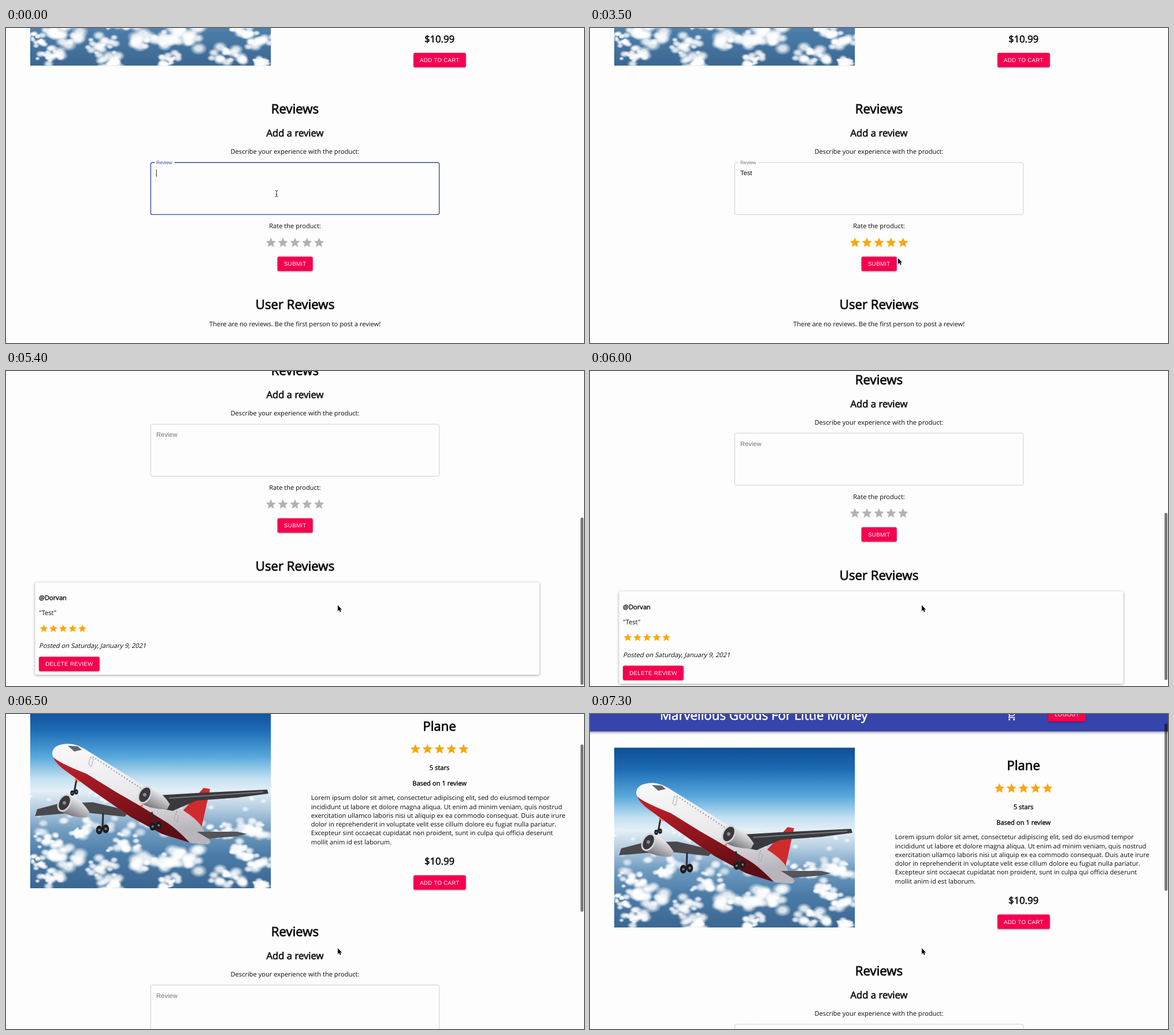
Animation of 1000x546 px, one loop 7.4 s. Source, as an HTML page:

```html
<!DOCTYPE html>
<html lang="en">
<head>
<meta charset="utf-8">
<title>Product reviews</title>
<style>
  html, body { margin: 0; width: 100%; height: 100%; overflow: hidden; background: #fdfdfd; }
  svg { display: block; width: 1000px; height: 546px; }
  text { font: 11.11px "Open Sans", "Noto Sans", sans-serif; fill: #0c0c0c; text-rendering: geometricPrecision; white-space: pre; }
  .mid { text-anchor: middle; }
  .h1 { font-size: 22.22px; }
  .h2 { font-size: 16.67px; }
  .bold { stroke: #0c0c0c; stroke-width: .036em; }
  .ui { font-family: "Liberation Sans", Arial, sans-serif; }
  .btn text { font: 9.72px "Liberation Sans", Arial, sans-serif; letter-spacing: .278px; fill: #fff; }
  .btn rect { fill: #f50050; filter: drop-shadow(0 1px 1px rgba(0,0,0,.38)); }
  .btn.over rect { fill: #ab003c; filter: drop-shadow(0 1.4px 2px rgba(0,0,0,.45)); }
  .card { fill: #fdfdfd; filter: drop-shadow(0 1.8px 2.2px rgba(0,0,0,.38)); }
  .bar { fill: #3645ac; filter: drop-shadow(0 2px 2px rgba(0,0,0,.35)); }
</style>
</head>
<body>
<svg id="stage" viewBox="0 0 1000 546">
  <defs>
    <linearGradient id="sky" x2="0" y2="1">
      <stop offset="0" stop-color="#0f4f96"/>
      <stop offset=".12" stop-color="#1d6bb5"/>
      <stop offset=".27" stop-color="#58a8dc"/>
      <stop offset=".39" stop-color="#c3e0f1"/>
      <stop offset=".46" stop-color="#e4eff7"/>
      <stop offset=".56" stop-color="#b3cce0"/>
      <stop offset=".68" stop-color="#6f9bc0"/>
      <stop offset=".82" stop-color="#4a7ba7"/>
      <stop offset="1" stop-color="#3b6791"/>
    </linearGradient>
    <linearGradient id="hull" x2=".25" y2="1">
      <stop offset="0" stop-color="#fafafa"/>
      <stop offset=".6" stop-color="#e9e7ea"/>
      <stop offset="1" stop-color="#b9b5bc"/>
    </linearGradient>
    <linearGradient id="belly" x2=".3" y2="1">
      <stop offset="0" stop-color="#c8202a"/>
      <stop offset="1" stop-color="#5d0d14"/>
    </linearGradient>
    <linearGradient id="pod" x2="0" y2="1">
      <stop offset="0" stop-color="#eeeef0"/>
      <stop offset="1" stop-color="#77757b"/>
    </linearGradient>
    <radialGradient id="puff">
      <stop offset=".35" stop-color="#fff" stop-opacity=".9"/>
      <stop offset="1" stop-color="#fff" stop-opacity="0"/>
    </radialGradient>
    <clipPath id="frame"><rect x="41.7" y="58.2" width="416.8" height="311.8"/></clipPath>
    <path id="star" d="M12 17.27 18.18 21 16.54 13.97 22 9.24 14.81 8.63 12 2 9.19 8.63 2 9.24 7.46 13.97 5.82 21z"/>
  </defs>

  <g id="page">
    <g clip-path="url(#frame)">
      <rect x="41.7" y="58.2" width="416.8" height="311.8" fill="url(#sky)"/>
      <g id="clouds" fill="url(#puff)"></g>
      <g id="plane">
        <path d="M50 245 54 233 92 223 150 221 215 236 205 246 130 238z" fill="#4a484d"/>
        <path d="M342 196 353 198 338 266 303 239z" fill="#cf2b2c"/>
        <path d="M80 138C80 124 92 120 108 119.5Q122 120 135 128L180 156 230 187 305 234Q335 253 341 268L354 290 350 294 322 292 270 276 215 246 150 201 108 170Q84 153 80 138z" fill="url(#hull)"/>
        <path d="M82 143Q90 152 140 172L190 203 235 229 275 254Q292 264 318 291L270 276 215 246 150 201 108 170Q85 154 82 143z" fill="url(#belly)"/>
        <path d="M150 142 296 238" stroke="#8d97a5" stroke-width="2" stroke-dasharray="2 3.4" fill="none"/>
        <path d="M107 123 124 124 131 130 118 133z" fill="#5f666f"/>
        <path d="M146 142l5 4-3 13-5-4zM293 240l5 4-2 12-5-4z" fill="none" stroke="#a9a6ac"/>
        <path d="M262 209 330 205 452 199 454 206 400 213 330 218 288 236 252 228z" fill="#3a393d"/>
        <path d="M282 214 445 203" stroke="#77767b" stroke-width="2"/>
        <path d="M330 272 400 272 417 276 400 280 350 284z" fill="#55545a"/>
        <path d="M122 182 118 203M168 240 167 268M252 238 259 262" stroke="#2b2a2d" stroke-width="3"/>
        <g id="pods"></g>
        <g id="wheels" fill="#1d1c1f"></g>
        <g fill="#ff6a3c"><circle cx="121" cy="182" r="2"/><circle cx="126" cy="184" r="1.6"/><circle cx="235" cy="227" r="2"/></g>
      </g>
    </g>

    <rect class="bar" x="-10" y="-30" width="1020" height="60.3"/>
    <text class="h1" x="121" y="10" style="fill:#fff;stroke:#fff;stroke-width:.03em">Marvellous Goods For Little Money</text>
    <path transform="translate(720 -6.6) scale(.8)" fill="#fff" d="M15.55 13c.75 0 1.41-.41 1.75-1.03l3.58-6.49A1 1 0 0 0 20 4H5.21l-.94-2H1v2h2l3.6 7.59-1.35 2.44C4.52 15.37 5.48 17 7 17h12v-2H7l1.1-2zM6.16 6h12.15l-2.76 5H8.53zM7 18a2 2 0 1 0 0 4 2 2 0 1 0 0-4zm10 0a2 2 0 1 0 0 4 2 2 0 1 0 0-4z"/>
    <g class="btn"><rect x="792.5" y="-11.7" width="65" height="25" rx="2.8"/><text class="mid" x="825" y="4.4">LOGOUT</text></g>

    <text class="mid h1 bold" x="750" y="96.5">Plane</text>
    <g id="score"></g>
    <text class="mid bold" x="750" y="165">5 stars</text>
    <text class="mid bold" x="750" y="191.5">Based on 1 review</text>
    <g id="blurb"></g>
    <text class="mid h2 bold" x="750" y="329">$10.99</text>
    <g class="btn"><rect x="705" y="347.6" width="90.6" height="25" rx="2.8"/><text class="mid" x="750.2" y="363.6">ADD TO CART</text></g>

    <g transform="translate(0 304.5)">
      <text class="mid h1 bold" x="500" y="148.4">Reviews</text>
      <text class="mid h2 bold" x="500" y="188">Add a review</text>
      <text class="mid" x="500" y="218.2">Describe your experience with the product:</text>
      <path id="outline" fill="none" d="M291.5 233.2H746.8a2.8 2.8 0 0 1 2.8 2.8V320.6a2.8 2.8 0 0 1-2.8 2.8H253.2a2.8 2.8 0 0 1-2.8-2.8V236a2.8 2.8 0 0 1 2.8-2.8H257"/>
      <path id="notch" d="M257 233.2H291.5" stroke="#c3c3c3" stroke-width=".8"/>
      <text id="label" class="ui">Review</text>
      <text id="typed" class="ui" x="260" y="255.2"></text>
      <rect id="caret" y="245.3" width=".9" height="12.4" fill="#111"/>
      <text class="mid" x="500" y="347">Rate the product:</text>
      <g id="rating"></g>
      <g id="submit" class="btn"><rect x="469.7" y="396.2" width="61" height="25" rx="2.8"/><text class="mid" x="500.3" y="412.2">SUBMIT</text></g>

      <text class="mid h1 bold" x="500" y="487">User Reviews</text>
      <text id="none" class="mid" x="500" y="517.2">There are no reviews. Be the first person to post a review!</text>
      <g id="posted">
        <rect class="card" x="50.3" y="507.6" width="872.4" height="159.8" rx="2.5"/>
        <text class="bold" x="57" y="538">@Dorvan</text>
        <text x="57" y="564.2">"Test"</text>
        <g id="given"></g>
        <text transform="translate(57 621.4) skewX(-14)">Posted on Saturday, January 9, 2021</text>
        <g class="btn"><rect x="57" y="636.2" width="104.8" height="25" rx="2.8"/><text class="mid" x="109.5" y="652.2">DELETE REVIEW</text></g>
      </g>
    </g>
  </g>

  <rect id="thumb" x="994" width="5" height="290" rx="2.5" fill="#000" fill-opacity=".52"/>
  <g id="cursor">
    <path id="arrow" d="M0 0V10.2L2.3 8.1 3.9 11.7 5.6 11 4.1 7.4H7.1z" fill="#000" stroke="#fff" stroke-width=".9" paint-order="stroke"/>
    <path id="beam" d="M-2.6-5.3Q0-5.3 0-3.6 0-5.3 2.6-5.3M0-3.6V3.6M-2.6 5.3Q0 5.3 0 3.6 0 5.3 2.6 5.3M-1.3 1.6H1.3" fill="none" stroke="#222" stroke-width=".9"/>
    <path id="hand" d="M-1 0Q0-1 1 0V4L5.4 5V9L4 12H-1.4L-4.4 7.4Q-4-6.2-1 8.4z" fill="#fff" stroke="#111" stroke-width=".8"/>
  </g>
</svg>

<script>
const LOOP = 7400, STEP = 100;
const GOLD = '#ffa606', GREY = '#b2b2b2';
const $ = id => document.getElementById(id);

function add(parent, tag, attrs, text) {
  const el = document.createElementNS('http://www.w3.org/2000/svg', tag);
  for (const k in attrs) el.setAttribute(k, attrs[k]);
  if (text) el.textContent = text;
  return parent.appendChild(el);
}

function stars(id, x, y, size) {
  for (let i = 0; i < 5; i++) {
    add($(id), 'use', { href: '#star', transform: `translate(${x + i * size} ${y}) scale(${size / 24})` });
  }
  $(id).setAttribute('fill', GOLD);
}
stars('score', 697.9, 118.2, 20.83);
stars('rating', 447.9, 361.6, 20.83);
stars('given', 57, 579, 16.67);

[
  'Lorem ipsum dolor sit amet, consectetur adipiscing elit, sed do eiusmod tempor',
  'incididunt ut labore et dolore magna aliqua. Ut enim ad minim veniam, quis nostrud',
  'exercitation ullamco laboris nisi ut aliquip ex ea commodo consequat. Duis aute irure',
  'dolor in reprehenderit in voluptate velit esse cillum dolore eu fugiat nulla pariatur.',
  'Excepteur sint occaecat cupidatat non proident, sunt in culpa qui officia deserunt',
  'mollit anim id est laborum.'
].forEach((line, i) => add($('blurb'), 'text', { x: 527.8, y: 217.4 + i * 15.25 }, line));

let seed = 7;
const rnd = () => (seed = seed * 16807 % 2147483647) / 2147483647;
const spread = r => (rnd() + rnd() - 1) * r;

function puff(cx, cy, rx, opacity) {
  add($('clouds'), 'ellipse', { cx, cy, rx, ry: rx * .75, opacity });
}
for (let i = 0; i < 90; i++) {
  const d = rnd();
  puff(42 + rnd() * 416, 205 + d * 75, 4 + d * 8, .7);
}
[
  [75, 287, 24], [125, 272, 20], [205, 292, 30], [370, 272, 26], [425, 272, 26],
  [100, 316, 38], [55, 325, 20], [165, 337, 34], [250, 322, 38], [318, 318, 40],
  [400, 302, 26], [432, 326, 32], [385, 355, 32], [75, 352, 30], [180, 364, 28],
  [280, 360, 24], [442, 362, 20]
].forEach(([x, y, size]) => {
  for (let i = 0; i < 20; i++) {
    puff(x + spread(size), y + spread(size * .6), size * (.16 + rnd() * .26), .9);
  }
});

for (const [x, y] of [[101, 222], [240, 208]]) {
  const pod = add($('pods'), 'g', { transform: `translate(${x} ${y}) rotate(28)` });
  add(pod, 'path', { d: 'M0-17Q24-19 46-6L46 4Q24 17 0 16z', fill: 'url(#pod)' });
  add(pod, 'ellipse', { rx: 11, ry: 16.5, fill: '#d5d4d8' });
  add(pod, 'ellipse', { rx: 8.5, ry: 13.5, fill: '#39383d' });
  add(pod, 'circle', { r: 3, fill: '#8a898f' });
}
for (const [x, y, r] of [[118, 204, 4.5], [167, 268, 7.5], [259, 262, 7]]) {
  for (const s of [-1, 1]) {
    add($('wheels'), 'ellipse', { cx: x + s * r * .75, cy: y - s, rx: r * .75, ry: r });
    add($('wheels'), 'circle', { cx: x + s * r * .75, cy: y - s, r: r * .3, fill: '#77767c' });
  }
}

// Rows are [time, value, ...]; values are interpolated between rows.
const SCROLL = [
  [4500, 304.5], [4600, 312], [4700, 345], [4800, 385], [4900, 415], [5000, 432],
  [5100, 440], [5200, 443.5], [5300, 445.2], [5400, 445.5], [5900, 445.5],
  [6000, 430], [6100, 385], [6200, 310], [6300, 217], [6400, 125], [6500, 68],
  [6600, 33], [6700, 14], [6800, 8], [6900, 5], [7000, 3], [7300, 0]
];
const MOUSE = [
  [2000, 468, 287], [2200, 478, 312], [2400, 520, 358], [2600, 541, 370], [3000, 541, 371],
  [3200, 540, 380], [3500, 533, 399], [3700, 515, 408], [4000, 514, 408], [4200, 545, 406], [4400, 574, 406]
];
const TYPING = [1200, 1400, 1600, 1800];
const BLUR = 2800, SENT = 4000;

function at(rows, t) {
  const i = rows.findIndex(r => r[0] > t);
  if (i === 0) return rows[0].slice(1);
  if (i < 0) return rows[rows.length - 1].slice(1);
  const a = rows[i - 1], b = rows[i], k = (t - a[0]) / (b[0] - a[0]);
  return a.slice(1).map((v, j) => v + (b[j + 1] - v) * k);
}

const show = (id, on) => $(id).style.display = on ? '' : 'none';

function caretOn(t) {
  if (t < TYPING[0]) return t < 100 || (t >= 600 && t < 1100);
  return t < 2300;
}

function draw(t) {
  const [scroll] = at(SCROLL, t);
  $('page').setAttribute('transform', `translate(0 ${-scroll})`);
  $('thumb').setAttribute('y', 16.5 + scroll * .533);
  show('thumb', t >= 4500);

  const focused = t < BLUR, sent = t >= SENT;
  $('outline').setAttribute('stroke', focused ? '#3645ac' : '#c3c3c3');
  $('outline').setAttribute('stroke-width', focused ? 1.4 : .8);
  show('notch', sent);

  const grow = Math.min(1, Math.max(0, (t - SENT + STEP) / 200));
  $('label').setAttribute('transform', `translate(260 ${235.6 + grow * 19.7}) scale(${.75 + grow * .25})`);
  $('label').style.fill = focused ? '#3645ac' : '#757575';

  const count = sent ? 0 : TYPING.filter(k => t >= k).length;
  $('typed').textContent = 'Test'.slice(0, count);
  $('caret').setAttribute('x', 259.8 + (count ? $('typed').getComputedTextLength() : 0));
  show('caret', caretOn(t));

  const [x, y] = at(MOUSE, t);
  const overStars = t < SENT && x > 448 && y > 361 && y < 383;
  const overSubmit = t < 4500 && x > 470 && x < 530.5 && y > 396 && y < 421;
  const lit = sent ? 0 : t >= BLUR ? 5 : overStars ? Math.ceil((x - 448) / 20.83) : 0;
  [...$('rating').children].forEach((s, i) => s.setAttribute('fill', i < lit ? GOLD : GREY));
  $('submit').classList.toggle('over', overSubmit);
  show('none', !sent);
  show('posted', sent);

  const hand = overStars || overSubmit, beam = y < 323 && t < 2400;
  $('cursor').setAttribute('transform', `translate(${x} ${y})`);
  show('cursor', t < TYPING[0] || t >= 2000);
  show('hand', hand);
  show('beam', beam);
  show('arrow', !hand && !beam);
}

const start = performance.now();
function tick() {
  const t = (performance.now() - start) % LOOP;
  draw(Math.floor(t / STEP) * STEP);
  requestAnimationFrame(tick);
}
tick();
</script>
</body>
</html>
```
